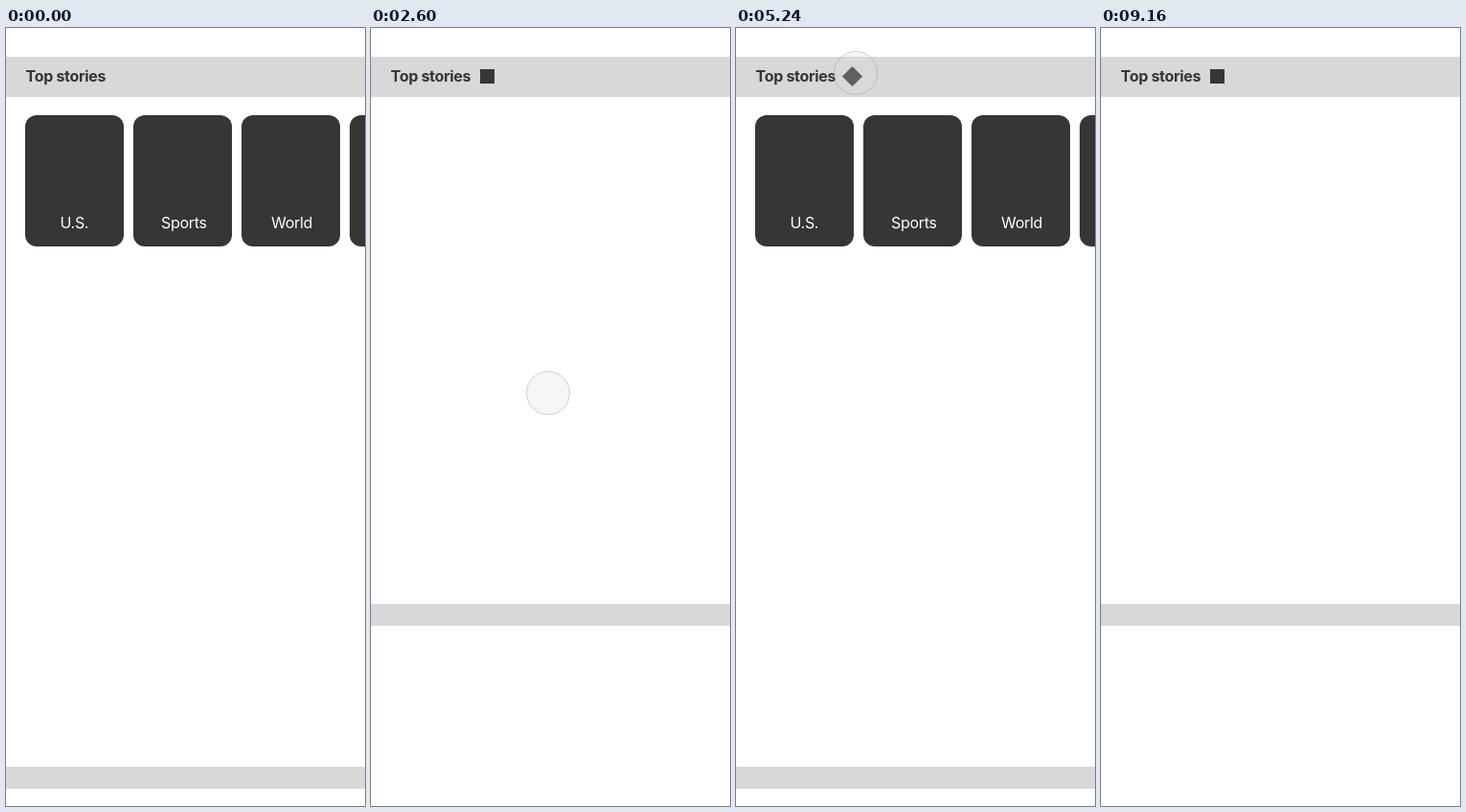
Animation of 375 by 812 pixels, one loop 9.96 s. Source, as an HTML page with a canvas:

```html
<!DOCTYPE html>
<html lang="en">
<head>
<meta charset="utf-8">
<title>Top stories</title>
<style>
html, body { margin: 0; width: 100%; height: 100%; overflow: hidden; background: #fff; }
canvas { display: block; }
</style>
</head>
<body>
<canvas id="stage" width="375" height="812"></canvas>
<script>
const ctx = document.getElementById('stage').getContext('2d');
const LOOP = 9960, STEP = 40, FOLD = 350, LINE = 19.4, BASE = 15.5;
const DARK = '#363636', GREY = '#d8d8d8';
const FONT = 'px Inter, "Liberation Sans", sans-serif';

// label, its lines when folded, left edge and width open, width folded
const cards = [
  { text: 'U.S.', lines: ['U', '.', 'S', '.'], x: 36.5, w: 30, fold: 11.5 },
  { text: 'Sports', lines: [...'Sports'], x: 29, w: 45.5, fold: 10.2 },
  { text: 'World', lines: ['W', 'o', 'rl', 'd'], x: 31, w: 41.5, fold: 16 },
  null
];

const mix = (a, b, p) => a + (b - a) * p;
const clamp = v => Math.min(1, Math.max(0, v));

function bezier(x1, y1, x2, y2) {
  const at = (a, b, u) => 3 * a * u * (1 - u) ** 2 + 3 * b * u * u * (1 - u) + u ** 3;
  return x => {
    if (x <= 0 || x >= 1) return clamp(x);
    let lo = 0, hi = 1;
    for (let i = 0; i < 30; i++) {
      const mid = (lo + hi) / 2;
      if (at(x1, x2, mid) < x) lo = mid; else hi = mid;
    }
    return at(y1, y2, lo);
  };
}
const ease = bezier(.25, .1, .25, 1);
const glide = bezier(.4, 0, .3, 1);
const curve = (a, b, c, p) => mix(mix(a, b, p), mix(b, c, p), p);

function foldAt(t) {
  const run = start => ease(clamp((t - start) / FOLD));
  if (t < 4882) return run(2245);
  return t < 7262 ? 1 - run(4882) : run(7262);
}

function cursorAt(t) {
  const move = (start, end, a, b, c) => {
    const p = glide(clamp((t - start) / (end - start)));
    return [curve(a[0], b[0], c[0], p), curve(a[1], b[1], c[1], p)];
  };
  if (t < 920) return null;
  if (t < 960) return [366, 1];
  if (t < 1120) return null;
  if (t < 3560) return move(1120, 1560, [399, 433], [250, 368], [185, 381]);
  if (t < 4680) return move(3560, 4520, [185, 381], [170, 200], [126, 47]);
  if (t < 8640) return move(4640, 4760, [126, 47], [125.5, 47], [125, 47]);
  return move(8640, 9160, [125, 47], [250, 58], [400, -2]);
}

function rect(color, x, y, w, h) {
  ctx.fillStyle = color;
  ctx.fillRect(x, y, w, h);
}

function drawLabel(card, q, column) {
  const lines = column ? card.lines : [card.text];
  const w = mix(card.w, card.fold, q);
  const h = mix(LINE, LINE * card.lines.length, q);
  ctx.translate(mix(card.x, (20.5 - card.fold) / 2, q), mix(102.5, 6.5, q));
  ctx.scale(w / (column ? card.fold : card.w), h / (LINE * lines.length));
  ctx.fillStyle = '#fff';
  ctx.font = '400 16' + FONT;
  ctx.letterSpacing = '-0.3px';
  lines.forEach((s, i) => ctx.fillText(s, 0, BASE + i * LINE));
}

function drawCard(card, i, q, column) {
  ctx.save();
  ctx.globalAlpha = 1 - q;
  ctx.translate(mix(20 + 113 * i, 109, q), mix(91, 41, q));
  ctx.beginPath();
  ctx.roundRect(0, 0, mix(103, 20.5, q), mix(137, 22.5, q), 12);
  ctx.fillStyle = DARK;
  ctx.fill();
  ctx.clip();
  if (card) drawLabel(card, q, column);
  ctx.restore();
}

function drawToggle(angle, alpha) {
  ctx.save();
  ctx.globalAlpha = alpha;
  ctx.translate(121.5, 50.5);
  ctx.rotate(angle);
  rect(DARK, -7.5, -7.5, 15, 15);
  ctx.restore();
}

function drawCursor([x, y]) {
  ctx.beginPath();
  ctx.arc(x, y, 22.5, 0, 2 * Math.PI);
  ctx.fillStyle = 'rgba(218,218,218,.25)';
  ctx.fill();
  ctx.strokeStyle = 'rgba(151,151,151,.45)';
  ctx.lineWidth = 1;
  ctx.stroke();
}

function draw(t) {
  const q = foldAt(t);
  rect('#fff', 0, 0, 375, 812);
  rect(GREY, 0, 30, 375, 42);
  rect(GREY, 0, mix(771, 601, q), 375, 23);
  ctx.fillStyle = DARK;
  ctx.font = '700 16' + FONT;
  ctx.letterSpacing = '-0.3px';
  ctx.fillText('Top stories', 20.5, 56);
  const opening = t >= 4882 && t < 7262;
  const column = !opening && q > 0;
  if (q < 1) cards.forEach((card, i) => drawCard(card, i, q, column));
  const first = t < 4882;
  drawToggle(first ? 0 : (1 - q) * Math.PI / 4, first ? q : 1);
  const cursor = cursorAt(t);
  if (cursor) drawCursor(cursor);
}

function frame(now) {
  draw(Math.floor(now % LOOP / STEP) * STEP);
  requestAnimationFrame(frame);
}
requestAnimationFrame(frame);
</script>
</body>
</html>
```
